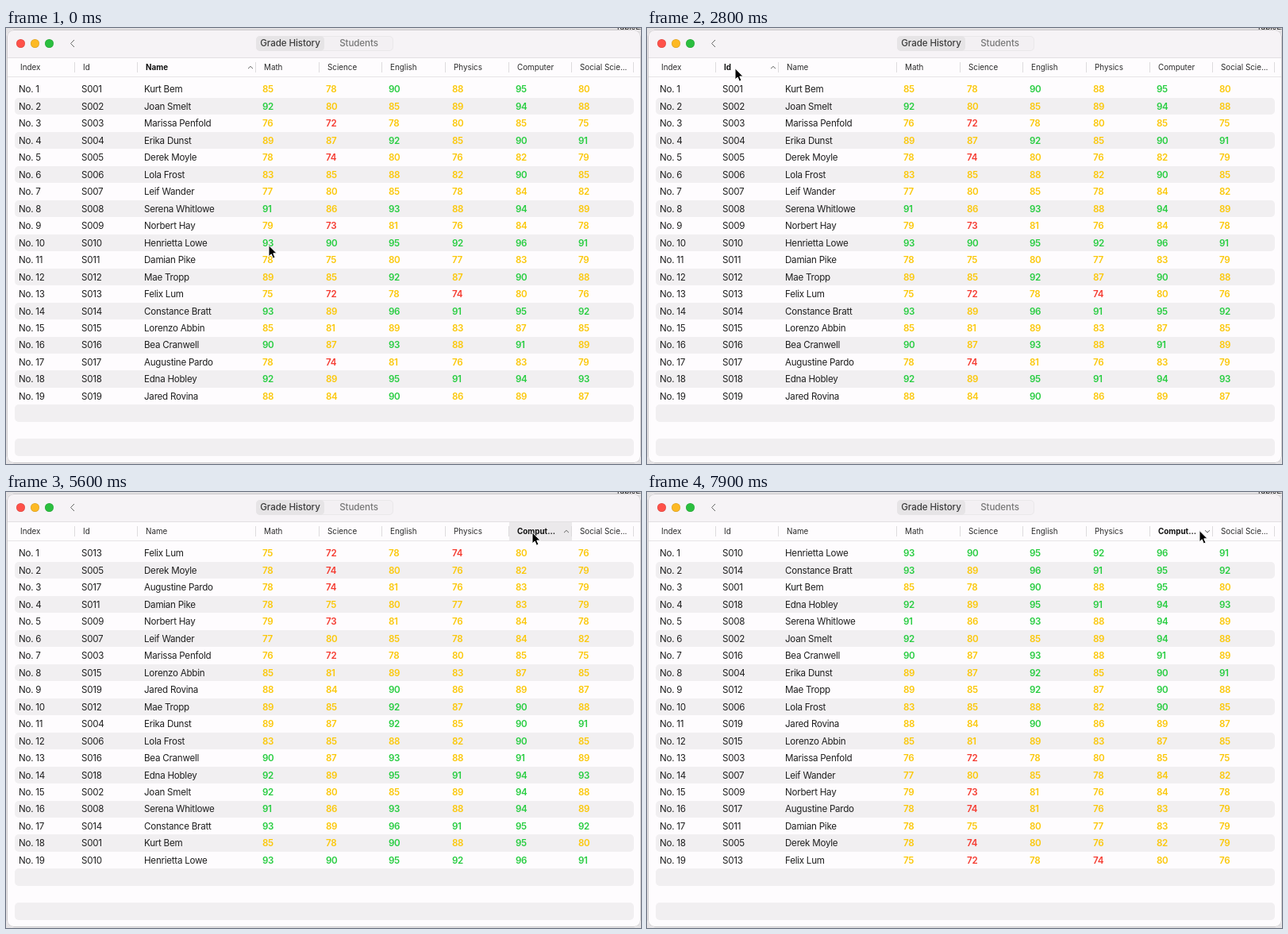
Recreate the animation shown at these times as an HTML page. Size 800 by 549 pixels, loop 8000 ms.

```html
<!DOCTYPE html>
<html lang="en">
<head>
<meta charset="utf-8">
<title>Grade History</title>
<style>
  html, body { margin: 0; width: 100%; height: 100%; overflow: hidden; }
  body { position: relative; background: #e4e2e4; font: 11.6px/20px Inter, "Open Sans", sans-serif;
    letter-spacing: -0.1px; color: #1e1e1e; }
  body *, #win::after { position: absolute; box-sizing: border-box; white-space: nowrap; }
  #stage { left: 0; top: 0; width: 800px; height: 549px; overflow: hidden; }
  #behind { left: 768px; top: -10px; font-size: 10px; line-height: 16px; }
  #win { left: 1px; top: 2px; width: 799px; height: 546px; border-radius: 9px;
    background: #fefcfe; overflow: hidden; }
  #win::after { content: ""; inset: 0; border: 1px solid #cbc9cb; border-radius: 9px; }
  #bar { left: 0; top: 0; width: 100%; height: 36px; background: #f6f3f6; border-bottom: 1px solid #e2e0e2; }
  .light { top: 13.8px; width: 11.4px; height: 11.4px; border-radius: 50%;
    box-shadow: inset 0 0 0 0.7px rgba(0, 0, 0, 0.13); }
  .tabs { left: 315px; top: 10px; width: 173px; height: 19px; border-radius: 5px;
    background: #f3f0f3; border: 1px solid #eae8ea; }
  .tab { top: 10px; height: 19px; line-height: 19px; text-align: center; font-weight: 500; border-radius: 5px; }
  .on { background: #e6e4e6; color: #3c3c3c; }
  .off { color: #777; }
  #rule { left: 2px; top: 61px; width: 797px; height: 1px; background: #e6e4e6; }
  .head { top: 38px; height: 23px; font-size: 9.85px; line-height: 23px; letter-spacing: 0; color: #2a2a2a; }
  .head.sorted { font-weight: 700; color: #111; }
  .head.pressed { background: #ebe9eb; }
  .head span { left: 9.6px; top: 0; }
  .head i { right: 0; top: 5px; width: 1px; height: 13px; background: #dddbdd; }
  .head svg { right: 4.5px; top: 9.5px; display: none; }
  .head.sorted svg { display: block; }
  .head.desc svg { transform: scaleY(-1); }
  .stripe { left: 11px; width: 780px; height: 21.4px; border-radius: 5px; background: #f1eff1; }
  .cell { letter-spacing: -0.25px; }
  .score { font-weight: 600; letter-spacing: -0.3px; }
  svg { fill: none; stroke: #666; overflow: visible; }
</style>
</head>
<body>
<div id="stage">
  <div id="behind">TableEx</div>
  <div id="win"><div id="bar"></div></div>
  <div class="light" style="left:12.8px;background:#ff5149"></div>
  <div class="light" style="left:30.8px;background:#fdb924"></div>
  <div class="light" style="left:48.8px;background:#2bbf3f"></div>
  <svg style="left:81px;top:14.8px" width="5" height="9" stroke-width="1"><path d="M5 0 0.5 4.5 5 9"/></svg>
  <div class="tabs"></div>
  <div class="tab on" style="left:315px;width:86px">Grade History</div>
  <div class="tab off" style="left:401px;width:87px">Students</div>
  <div id="rule"></div>
  <div id="table"></div>
  <svg id="cursor" width="12" height="18" style="left:0;top:0">
    <path d="M0 0V14.2L3.2 11.3 5.4 16.5 8 15.4 5.8 10.3H10.2Z" fill="#000" stroke="#fff" stroke-width="1"/>
  </svg>
</div>
<script>
const LOOP = 8000, STEP = 100, PITCH = 21.47, TOP = 77.4;
const edges = [8.4, 87.4, 166.4, 315.4, 395.4, 474.4, 554.4, 634.4, 713.4, 791.4];
const titles = ["Index", "Id", "Name", "Math", "Science", "English", "Physics", "Computer", "Social Scie..."];
const shortTitles = { 7: "Comput...", 8: "Social..." };

const students = `Kurt Bem,85 78 90 88 95 80
Joan Smelt,92 80 85 89 94 88
Marissa Penfold,76 72 78 80 85 75
Erika Dunst,89 87 92 85 90 91
Derek Moyle,78 74 80 76 82 79
Lola Frost,83 85 88 82 90 85
Leif Wander,77 80 85 78 84 82
Serena Whitlowe,91 86 93 88 94 89
Norbert Hay,79 73 81 76 84 78
Henrietta Lowe,93 90 95 92 96 91
Damian Pike,78 75 80 77 83 79
Mae Tropp,89 85 92 87 90 88
Felix Lum,75 72 78 74 80 76
Constance Bratt,93 89 96 91 95 92
Lorenzo Abbin,85 81 89 83 87 85
Bea Cranwell,90 87 93 88 91 89
Augustine Pardo,78 74 81 76 83 79
Edna Hobley,92 89 95 91 94 93
Jared Rovina,88 84 90 86 89 87`.split("\n").map((line, i) => {
  const [name, scores] = line.split(",");
  return ["", "S" + String(i + 1).padStart(3, "0"), name, ...scores.split(" ")];
});

// Mouse release time, column, direction (1 ascending, -1 descending)
const clicks = [
  [700, 2, -1], [1500, 2, 1], [2400, 1, 1], [3000, 1, -1], [3800, 3, 1], [4200, 3, -1],
  [5200, 7, 1], [5700, 7, -1], [6300, 8, 1], [7000, 8, -1], [7400, 7, 1], [7700, 7, -1]
];

// Each sort is stable and starts from the order before it
const orders = [students];
for (const [, col, dir] of clicks) {
  orders.push([...orders.at(-1)].sort((a, b) => dir * (a[col] < b[col] ? -1 : a[col] > b[col] ? 1 : 0)));
}

// Pointer stops: time, x, y
const path = [
  [0, 331, 273.5], [100, 331, 273.5], [600, 229, 55.5], [1700, 229, 55.5], [2300, 111, 50.7], [3100, 111, 50.7],
  [3700, 345, 51], [4300, 345, 51], [4700, 659, 51.7], [5200, 663, 50.7], [5800, 663, 50.7],
  [6200, 740, 47.7], [7050, 740, 47.7], [7300, 696, 48.5], [LOOP, 696, 48.5]
];

const table = document.getElementById("table");
const cursor = document.getElementById("cursor");

function add(cls, style, html = "") {
  const el = document.createElement("div");
  el.className = cls;
  el.innerHTML = html;
  Object.assign(el.style, style);
  table.append(el);
  return el;
}
const px = n => n + "px";

const heads = titles.map((title, c) => add("head", {
  left: px(edges[c]), width: px(edges[c + 1] - edges[c])
}, `<span>${title}</span><i></i><svg width="6" height="3.4" stroke-width="1"><path d="M0 3.2 3 0.3 6 3.2"/></svg>`));

for (let r = 1; r < 22; r += 2) add("stripe", { top: px(TOP + r * PITCH - 10.9) });

const cells = students.map((_, r) => titles.map((_, c) => add(c > 2 ? "cell score" : "cell", {
  left: px(edges[c] + 7.6), top: px(TOP + r * PITCH - 10)
})));

function scoreColor(score) {
  return score >= 90 ? "#28cd41" : score < 75 ? "#f53b30" : "#fbc80a";
}

function showRows(order) {
  order.forEach((student, r) => student.forEach((value, c) => {
    const cell = cells[r][c];
    cell.textContent = c ? value : "No. " + (r + 1);
    if (c > 2) cell.style.color = scoreColor(+value);
  }));
}

function showHeads(t) {
  const last = clicks.filter(k => k[0] <= t).at(-1) || [0, 2, 1];
  const down = clicks.find(k => t >= k[0] - STEP && t < k[0]);
  heads.forEach((head, c) => {
    const sorted = c === last[1];
    head.classList.toggle("sorted", sorted);
    head.classList.toggle("desc", sorted && last[2] < 0);
    head.classList.toggle("pressed", !!down && down[1] === c);
    head.firstChild.textContent = sorted && shortTitles[c] || titles[c];
  });
}

function moveCursor(t) {
  const i = path.findIndex(p => p[0] > t);
  const [t0, x0, y0] = path[i - 1], [t1, x1, y1] = path[i];
  const u = (t - t0) / (t1 - t0), e = u * u * (3 - 2 * u);
  cursor.style.transform = `translate(${x0 + (x1 - x0) * e}px, ${y0 + (y1 - y0) * e}px)`;
}

let shownTime = -1, shownOrder = -1;
function draw(now) {
  const t = Math.floor(now % LOOP / STEP) * STEP;
  if (t !== shownTime) {
    shownTime = t;
    // Rows follow the header one step later
    const n = clicks.filter(k => k[0] + STEP <= t).length;
    if (n !== shownOrder) showRows(orders[shownOrder = n]);
    showHeads(t);
    moveCursor(t);
  }
}

const start = performance.now();
function tick() {
  draw(performance.now() - start);
  requestAnimationFrame(tick);
}
tick();
</script>
</body>
</html>
```
